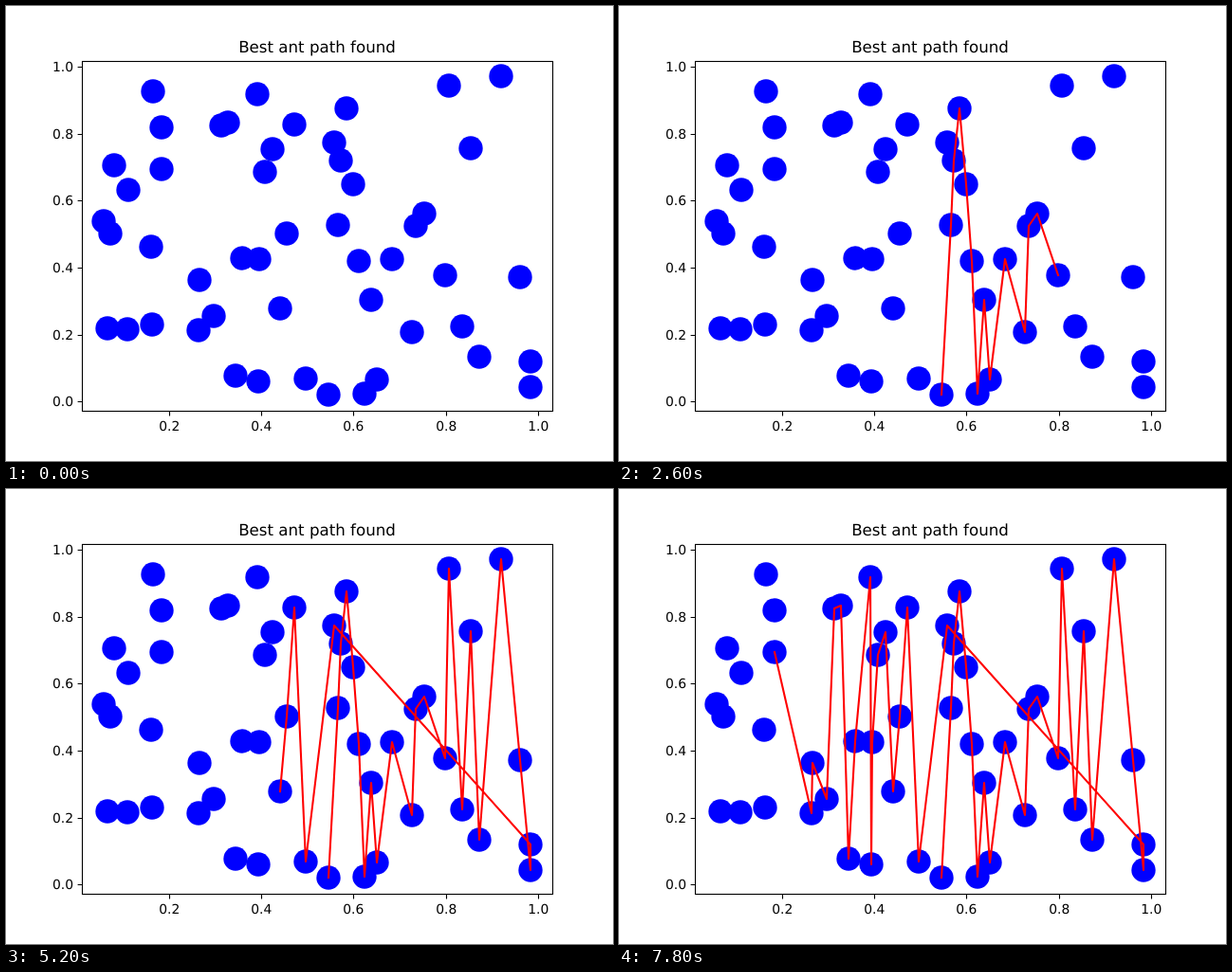
These frames come from a looping animation (640x480 px, 8000 ms). An HTML page:

```html
<!DOCTYPE html>
<html lang="en">
<head>
<meta charset="utf-8">
<title>Best ant path found</title>
<style>
  html, body { margin: 0; width: 100%; height: 100%; overflow: hidden; background: #fff; }
  svg { display: block; width: 640px; height: 480px; }
  text { font: 13.89px "DejaVu Sans", sans-serif; text-anchor: middle; text-rendering: geometricPrecision; }
  .title { font-size: 16.67px; }
  .left text { text-anchor: end; }
  .axes { fill: none; stroke: #000; stroke-width: 1.11; }
  .nodes { fill: #00f; }
  .trail { fill: none; stroke: #f00; stroke-width: 2.08; stroke-linecap: square; stroke-linejoin: round; }
</style>
</head>
<body>
<svg viewBox="0 0 640 480">
  <g class="nodes" id="nodes"></g>
  <polyline class="trail" id="trail"/>
  <path class="axes" id="ticks"/>
  <rect class="axes" x="80.5" y="58.5" width="496" height="369"/>
  <g id="bottomLabels"></g>
  <g id="leftLabels" class="left"></g>
  <text class="title" x="328" y="49">Best ant path found</text>
</svg>
<script>
const STEP = 200, LOOP = 8000, RADIUS = 12.7;
const route = [];

const $ = id => document.getElementById(id);

function add(parent, tag, attrs, text = "") {
  const el = document.createElementNS("http://www.w3.org/2000/svg", tag);
  for (const key in attrs) el.setAttribute(key, attrs[key]);
  el.textContent = text;
  parent.append(el);
}

// Adds nodes evenly spaced from one x to another, at the given heights.
function sweep(from, to, ...heights) {
  const gap = (to - from) / (heights.length - 1);
  heights.forEach((y, i) => route.push([Math.round(from + gap * i), y]));
}

// The ant walks right, then jumps back and walks left.
sweep(340, 350, 410, 231);
sweep(353, 391, 163, 108, 188, 269, 409, 310, 394);
sweep(407, 428, 267, 344);
sweep(432, 441, 232, 219);
sweep(463, 467, 284, 84);
sweep(481, 499, 338, 150, 370);
sweep(522, 542, 74, 286);
sweep(553, 553, 402, 375);
sweep(346, 316, 144, 393);
sweep(304, 273, 125, 240, 319, 151, 175);
sweep(267, 265, 267, 396, 93);
sweep(249, 219, 266, 390, 123, 126, 327);
sweep(204, 203, 289, 342);
sweep(164, 164, 172, 128);
sweep(155, 153, 90, 336, 254);
sweep(129, 128, 194, 341);
sweep(114, 103, 168, 240, 340, 227);

for (const [cx, cy] of route) add($("nodes"), "circle", { cx, cy, r: RADIUS });

let ticks = "";
for (let i = 0; i <= 5; i++) {
  const label = (i / 5).toFixed(1);
  const y = Math.round(417.3 - 70.63 * i);
  ticks += `M80.5 ${y + 0.5}h-4.9`;
  add($("leftLabels"), "text", { x: 71, y: y + 5 }, label);
  if (i === 0) continue;
  const x = Math.round(74.65 + 97.25 * i);
  ticks += `M${x + 0.5} 427.5v4.9`;
  add($("bottomLabels"), "text", { x: x + 0.2, y: 448 }, label);
}
$("ticks").setAttribute("d", ticks);

const start = performance.now();
let shown = -1;

function draw() {
  const edges = Math.floor(((performance.now() - start) % LOOP) / STEP);
  if (edges !== shown) {
    shown = edges;
    $("trail").setAttribute("points", edges ? route.slice(0, edges + 1).join(" ") : "");
  }
  requestAnimationFrame(draw);
}
draw();
</script>
</body>
</html>
```
